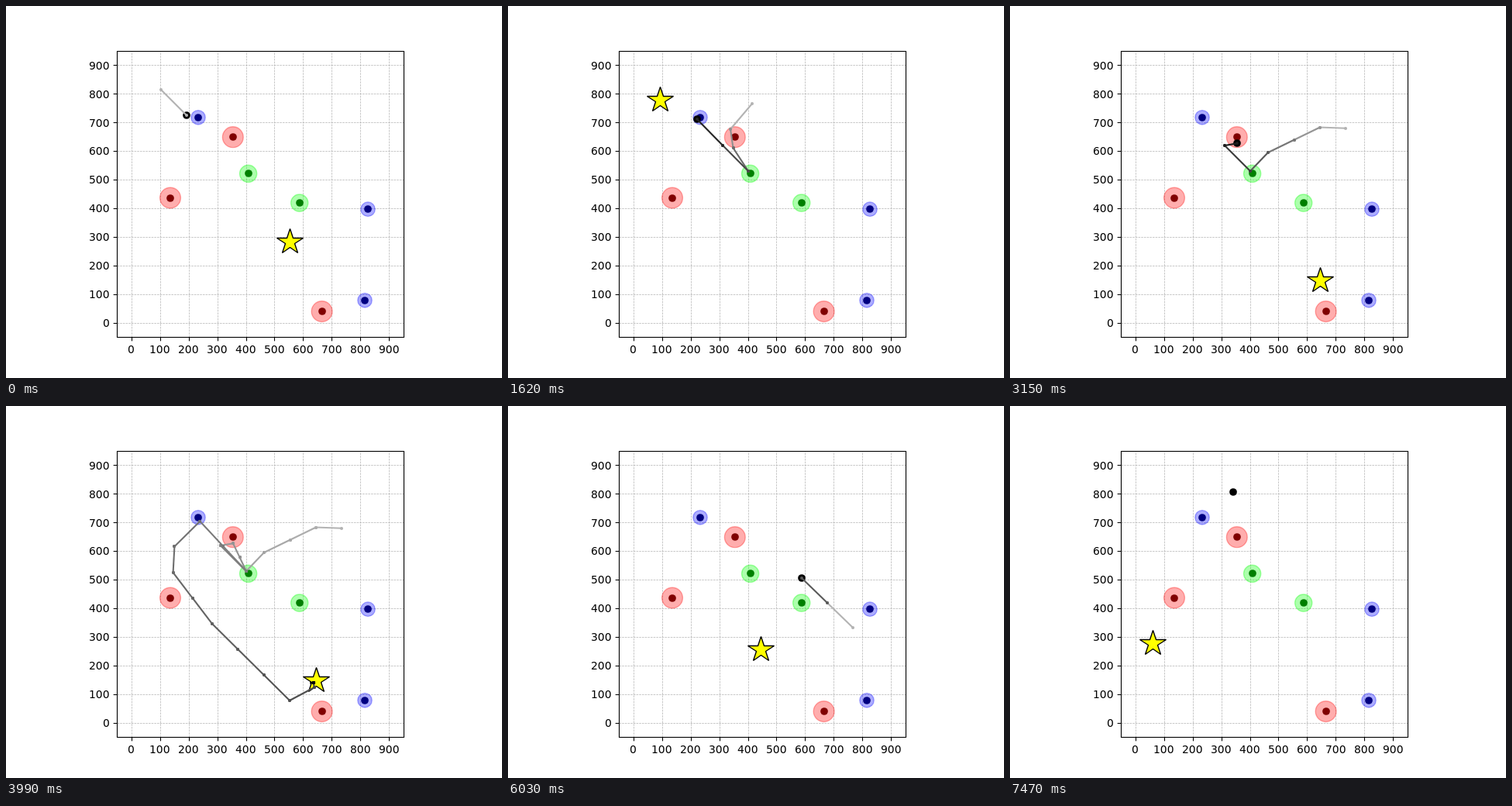
These frames come from a looping animation (640 by 480 pixels, 7.5 s). An HTML page with a canvas:

```html
<!DOCTYPE html>
<html lang="en">
<head>
<meta charset="utf-8">
<title>Path to the goal</title>
<style>
html, body { margin: 0; width: 100%; height: 100%; overflow: hidden; background: #fff; }
canvas { display: block; }
</style>
</head>
<body>
<canvas id="stage" width="640" height="480"></canvas>
<script>
const ctx = document.getElementById('stage').getContext('2d');
const FRAME_MS = 30, FRAMES = 250, RUN = 50;
const PT = 100 / 72;
const STRIDE = 34; // longest move per axis in one step
const BOX = { l: 143.5, r: 513.5, t: 58.5, b: 427.5 };

const kinds = [
  { halo: '255,0,0', core: '#800000', r: 13.4, at: [[212, 247.6], [292.8, 169.2], [407.6, 394.1]] },
  { halo: '0,255,0', core: '#008000', r: 11.1, at: [[312.6, 216.3], [378.7, 254.1]] },
  { halo: '0,0,255', core: '#000080', r: 9.2, at: [[248, 143.8], [467, 262.2], [463, 379.8]] }
];

// Turning points that several runs share
const BOUNCE = [310, 213], GAP = [277, 180], NORTH = [250.3, 148.8], WEST = [217.4, 181.2];

// Each run walks through its turning points and settles beside the goal
const runs = [
  { goal: [366, 304], via: [[200, 108], [233.2, 141.3], WEST] },
  { goal: [196, 121], via: [[315, 126], [287, 159], [290.5, 183], BOUNCE, [244, 146.3]] },
  { goal: [400, 354], via: [[433, 157.7], [400, 156.5], [333, 189], BOUNCE, GAP, [293, 177.3],
    BOUNCE, GAP, BOUNCE, NORTH, WEST, [215.6, 215], [266, 281], [366, 380], [398, 363]] },
  { goal: [302, 271], via: [[333, 126], [305.5, 159], [290.5, 189], [257.5, 156], [291.5, 180.5],
    BOUNCE, NORTH, WEST, [232.5, 215], [292, 280]] },
  { goal: [326, 314], via: [[445.3, 286.2], [379.2, 222.3]] },
  { goal: [184, 306], via: [[288.3, 111.2]] }
];

function walk({ goal, via }) {
  const path = [via[0]];
  for (const [x, y] of [...via.slice(1), [goal[0] - 3.5, goal[1] + 3]]) {
    const [x0, y0] = path[path.length - 1];
    const n = Math.ceil(Math.max(Math.abs(x - x0), Math.abs(y - y0)) / STRIDE);
    for (let i = 1; i <= n; i++) path.push([x0 + (x - x0) * i / n, y0 + (y - y0) * i / n]);
  }
  return path;
}
for (const run of runs) run.path = walk(run);

function line(x1, y1, x2, y2) {
  ctx.beginPath();
  ctx.moveTo(x1, y1);
  ctx.lineTo(x2, y2);
  ctx.stroke();
}

function disc(x, y, r) {
  ctx.beginPath();
  ctx.arc(x, y, r, 0, 2 * Math.PI);
  ctx.fill();
}

// Markers sit on whole pixels
const marker = ([x, y], r) => disc(Math.round(x), Math.round(y), r);

function star([x, y]) {
  const R = 12.5 * PT, snap = v => Math.round(v) + 0.5;
  ctx.beginPath();
  for (let i = 0; i < 10; i++) {
    const r = i % 2 ? R * 0.382 : R, a = i * Math.PI / 5;
    ctx.lineTo(x + snap(r * Math.sin(a)), y + snap(-r * Math.cos(a)));
  }
  ctx.closePath();
  ctx.fillStyle = '#ff0';
  ctx.fill();
  ctx.strokeStyle = '#000';
  ctx.lineWidth = PT;
  ctx.lineJoin = 'bevel';
  ctx.stroke();
  ctx.lineJoin = 'miter';
}

function axes() {
  ctx.font = `${10 * PT}px "DejaVu Sans", sans-serif`;
  for (let v = 0; v <= 900; v += 100) {
    const px = 143.2 + (v + 50) * 0.3696, py = 427.2 - (v + 50) * 0.3696;
    const gx = Math.round(px) + 0.5, gy = Math.round(py) + 0.5;
    ctx.strokeStyle = '#b0b0b0';
    ctx.lineWidth = 0.5 * PT;
    ctx.setLineDash([1.85 * PT, 0.8 * PT]);
    line(gx, BOX.b, gx, BOX.t);
    line(BOX.l, gy, BOX.r, gy);
    ctx.setLineDash([]);
    ctx.strokeStyle = ctx.fillStyle = '#000';
    ctx.lineWidth = 0.8 * PT;
    line(gx, BOX.b, gx, BOX.b + 4.86);
    line(BOX.l, gy, BOX.l - 4.86, gy);
    const w = ctx.measureText(v).width;
    ctx.fillText(v, Math.round(px - w / 2), 448);
    ctx.fillText(v, Math.round(133.5 - w), Math.round(py + 5.52));
  }
}

function field() {
  ctx.lineWidth = PT;
  for (const { halo, core, r, at } of kinds) {
    for (const p of at) {
      ctx.fillStyle = ctx.strokeStyle = `rgba(${halo},0.32)`;
      disc(...p, r);
      ctx.stroke();
      ctx.fillStyle = core;
      marker(p, 4.86);
    }
  }
}

function trail(points) {
  ctx.lineWidth = 1.5 * PT;
  ctx.lineCap = 'square';
  const last = points.length - 1;
  for (let i = 0; i < last; i++) {
    const [a, b] = [points[i], points[i + 1]];
    const g = Math.round(255 * 0.7 * (1 - i / last));
    ctx.fillStyle = ctx.strokeStyle = `rgb(${g},${g},${g})`;
    if (a !== b) line(...a, ...b);
    marker(a, 2.05);
    marker(b, 2.05);
  }
  ctx.lineCap = 'butt';
}

function draw(frame) {
  const k = frame + 1;
  const { goal, path } = runs[Math.floor(k / RUN)];
  const points = Array.from({ length: k % RUN + 1 },
    (_, i) => path[Math.min(i, path.length - 1)]);

  ctx.fillStyle = '#fff';
  ctx.fillRect(0, 0, 640, 480);
  axes();
  field();
  ctx.fillStyle = '#000';
  marker(points[points.length - 1], 4.86);
  star(goal);
  trail(points);
  ctx.strokeStyle = '#000';
  ctx.lineWidth = 0.8 * PT;
  ctx.strokeRect(BOX.l, BOX.t, BOX.r - BOX.l, BOX.b - BOX.t);
}

const start = performance.now();
function tick() {
  const t = Math.max(0, performance.now() - start);
  draw(Math.floor(t / FRAME_MS) % FRAMES);
  requestAnimationFrame(tick);
}
tick();
</script>
</body>
</html>
```
